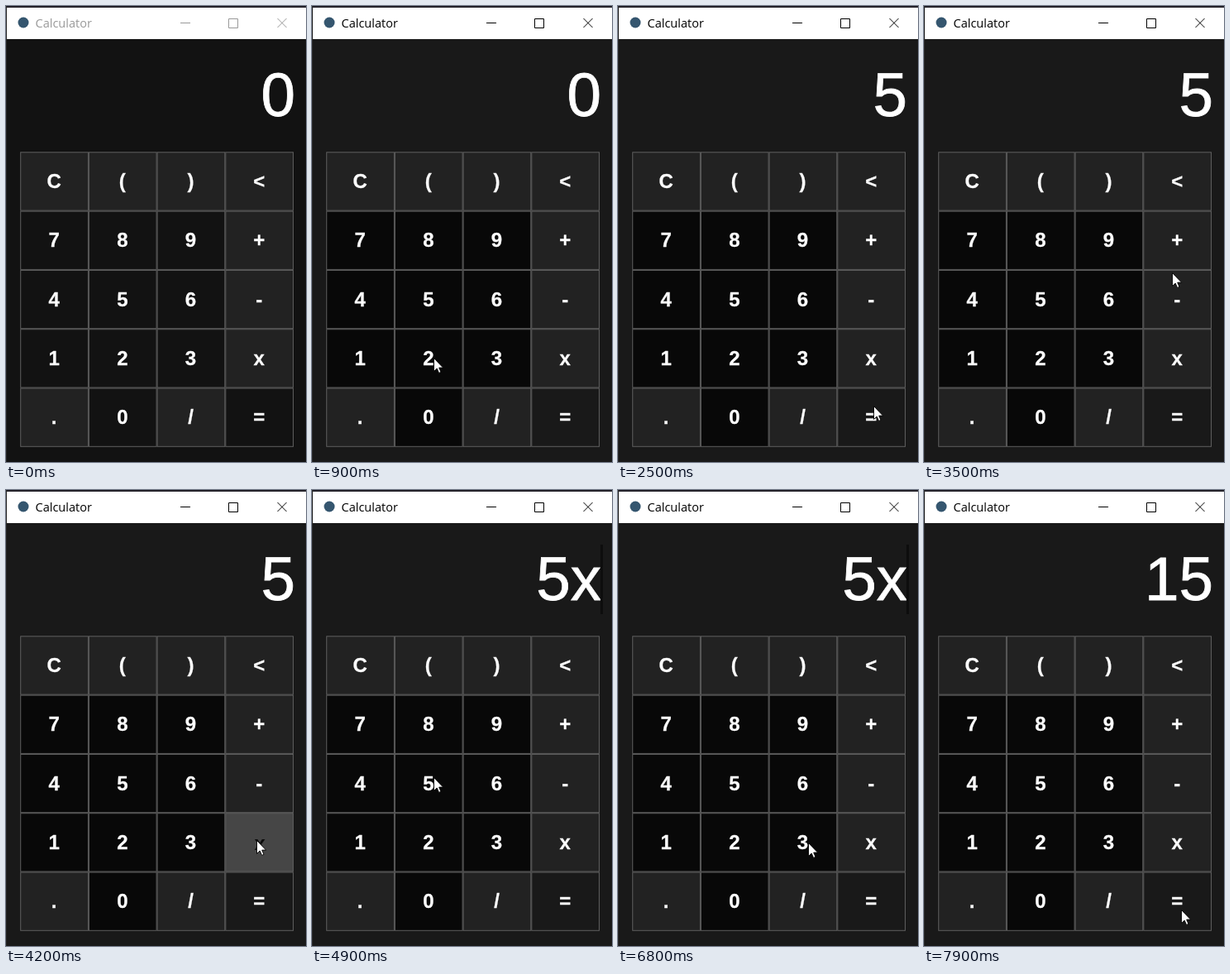
These frames come from a looping animation (363x551 px, 8 s). An HTML page:

```html
<!DOCTYPE html>
<html lang="en">
<head>
<meta charset="utf-8">
<title>Calculator</title>
<style>
  html, body { margin: 0; width: 100%; height: 100%; overflow: hidden; background: #191919; }
  svg { display: block; width: 363px; height: 551px; --bg: #191919; --digit: #080808; --ink: #000; }
  svg.idle { --bg: #121212; --digit: #121212; --ink: #999; }
  .bg { fill: var(--bg); }
  .title { font: 14.55px "Open Sans", sans-serif; fill: var(--ink); }
  .controls { fill: none; stroke: var(--ink); }
  .display { font: 74.67px "Liberation Sans", Arial, sans-serif; fill: #fff; stroke: #fff; stroke-width: .8; text-anchor: end; }
  .key rect { stroke: #5e5e5e; fill: #222; }
  .key.digit rect { fill: var(--digit); }
  .key.equals rect { fill: var(--bg); }
  .key text { font: bold 24px "Liberation Sans", Arial, sans-serif; fill: #fff; stroke: #fff; stroke-width: .3; text-anchor: middle; }
  .key.pressed rect { fill: #464646; }
  .key.pressed text { fill: #0c0c0c; stroke: none; transform: translate(1px, 1px); }
</style>
</head>
<body>
<svg viewBox="0 0 363 551">
  <rect class="bg" width="363" height="551"/>
  <rect width="363" height="2" fill="#24222a"/>
  <rect width="1" height="551" fill="#242424"/>
  <rect x="1" y="2" width="362" height="38" fill="#fff"/>
  <circle cx="21" cy="20" r="6.5" fill="#35566f"/>
  <text class="title" x="35.5" y="26">Calculator</text>
  <path class="controls" d="M211 20.5H223M269.5 15.5H280.5V26.5H269.5ZM328.5 15L339.5 26M339.5 15L328.5 26"/>
  <text class="display" x="350" y="133"></text>
  <rect id="caret" x="349" y="66" width="3" height="84" fill="#0d0d0d"/>
  <g id="keys"></g>
  <path id="pointer" d="M.5 .5V16.5L4.2 13L6.6 18.4L9 17.4L6.7 12.1H11.6Z" fill="#fff" stroke="#000" stroke-width=".9"/>
</svg>
<script>
const LOOP = 8000, STEP = 100, ACTIVATE = 400;
const CELL_W = 82.7, CELL_H = 71.3, GRID_X = 17.2, GRID_Y = 176.3;

// Pointer stops; those with a key click it one step after arriving.
const stops = [
  { at: 100, x: 340, y: 548 },
  { at: 900, x: 147, y: 425, key: '2' },
  { at: 1500, x: 300, y: 289, key: '+' },
  { at: 1800, x: 233, y: 425, key: '3' },
  { at: 2300, x: 309, y: 483, key: '=' },
  { at: 3200, x: 202, y: 387 },
  { at: 3500, x: 300, y: 322 },
  { at: 3700, x: 302, y: 281 },
  { at: 4100, x: 303, y: 423, key: 'x' },
  { at: 4900, x: 147, y: 347, key: '5' },
  { at: 5500, x: 323, y: 346 },
  { at: 5800, x: 305, y: 225, key: '<' },
  { at: 6300, x: 290, y: 423 },
  { at: 6800, x: 230, y: 426, key: '3' },
  { at: 7400, x: 311, y: 507, key: '=' }
];
const clicks = stops.filter(stop => stop.key);
const pressAt = stop => stop.at + STEP;
const releaseAt = stop => stop.at + 2 * STEP;

const svg = document.querySelector('svg');
const display = svg.querySelector('.display');
const caret = document.getElementById('caret');
const pointer = document.getElementById('pointer');
const keyLayer = document.getElementById('keys');
const keys = {};

function add(parent, tag, attrs) {
  const node = document.createElementNS('http://www.w3.org/2000/svg', tag);
  for (const name in attrs) node.setAttribute(name, attrs[name]);
  return parent.appendChild(node);
}

[...'C()<789+456-123x.0/='].forEach((label, i) => {
  const x = GRID_X + CELL_W * (i % 4), y = GRID_Y + CELL_H * Math.floor(i / 4);
  const kind = /\d/.test(label) ? 'digit' : label === '=' ? 'equals' : '';
  const key = add(keyLayer, 'g', { class: 'key ' + kind });
  add(key, 'rect', { x: x + 0.5, y: y + 0.5, width: CELL_W - 1, height: CELL_H - 1 });
  add(key, 'text', { x: x + CELL_W / 2 - 0.4, y: Math.round(y + 43.7) }).textContent = label;
  keys[label] = key;
});

function evaluate(sum) {
  const [a, b] = sum.split(/[+x]/).map(Number);
  return String(sum.includes('+') ? a + b : a * b);
}

function enter(value, key) {
  if (key === '=') return evaluate(value);
  if (key === '<') return value.slice(0, -1);
  return value === '0' ? key : value + key;
}

function pointerAt(t) {
  const i = stops.findLastIndex(stop => stop.at <= t);
  const from = stops[i], to = stops[i + 1] || from;
  const leave = from.key ? releaseAt(from) : from.at;
  const k = to === from ? 0 : Math.max(0, (t - leave) / (to.at - leave));
  const mix = axis => Math.round(from[axis] + (to[axis] - from[axis]) * k);
  return [mix('x'), mix('y')];
}

function render(t) {
  svg.classList.toggle('idle', t < ACTIVATE);

  const value = clicks.filter(click => releaseAt(click) <= t)
    .reduce((text, click) => enter(text, click.key), '0');
  display.textContent = value;
  caret.style.display = value.includes('x') ? '' : 'none';

  const held = clicks.find(click => pressAt(click) <= t && t < releaseAt(click));
  for (const label in keys) keys[label].classList.toggle('pressed', held?.key === label);

  const visible = t >= stops[0].at;
  pointer.style.display = visible ? '' : 'none';
  if (visible) pointer.setAttribute('transform', `translate(${pointerAt(t)})`);
}

const start = performance.now();
function tick() {
  const t = (performance.now() - start) % LOOP;
  render(Math.floor(t / STEP) * STEP);
  requestAnimationFrame(tick);
}
tick();
</script>
</body>
</html>
```
